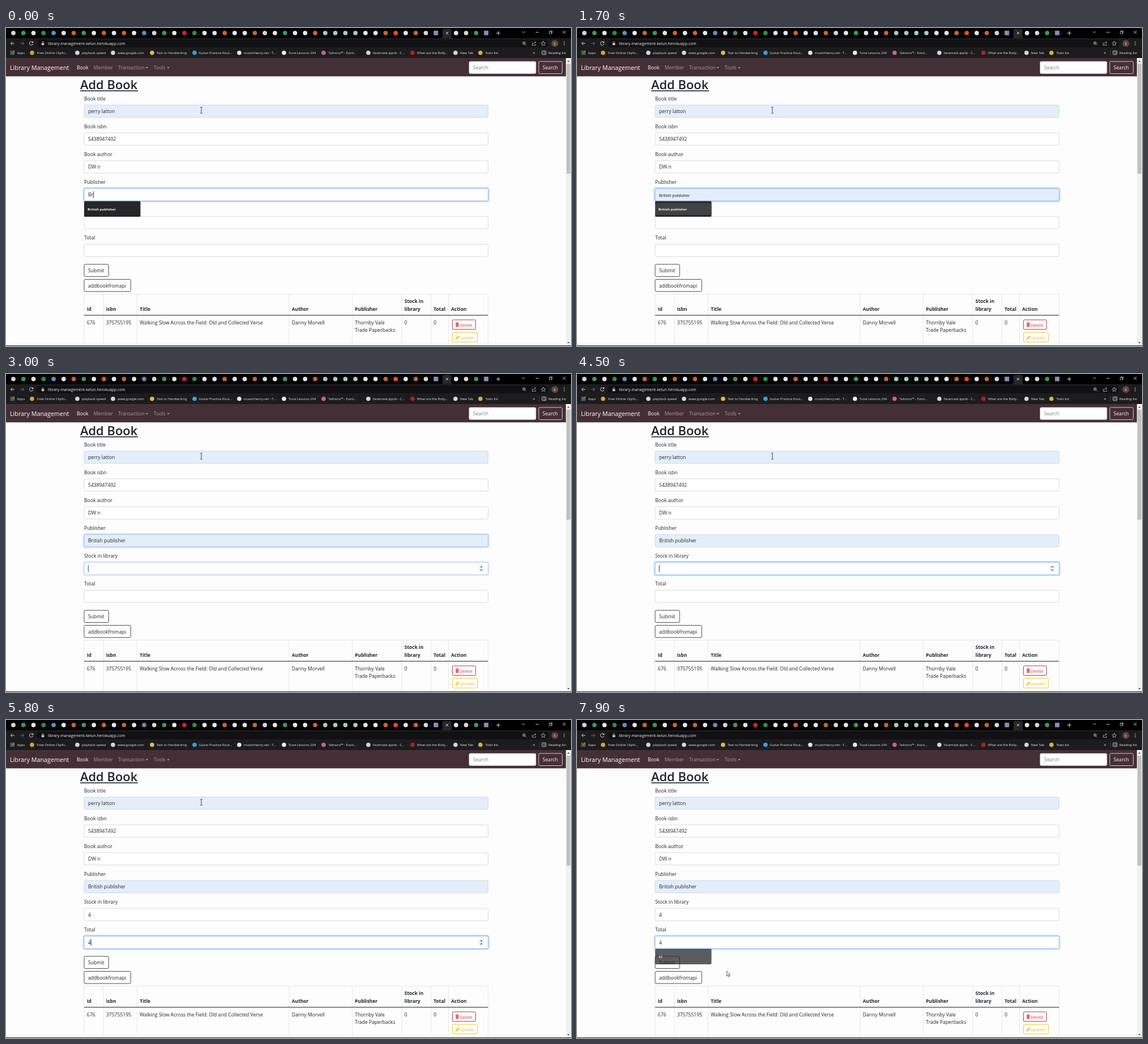
These frames come from a looping animation (998 px wide and 561 px high, 8000 ms). An HTML page:

```html
<!DOCTYPE html>
<html lang="en">
<head>
<meta charset="utf-8">
<title>Library Management</title>
<style>
html, body { margin: 0; width: 100%; height: 100%; overflow: hidden; background: #fdfdfd; }
svg { display: block; width: 998px; height: 561px; }
text { font-family: "Open Sans", "Noto Sans", sans-serif; white-space: pre; }
</style>
</head>
<body>
<svg id="stage" viewBox="0 0 998 561"></svg>
<script>
const LOOP = 8000;
const INK = '#212529', BODY = 8.62, LEFT = 138, RIGHT = 851.5;
const stage = document.getElementById('stage');

const attrs = o => Object.entries(o).map(([k, v]) => ` ${k}="${v}"`).join('');
const rect = (x, y, w, h, o = {}) => `<rect x="${x}" y="${y}" width="${w}" height="${h}"${attrs(o)}/>`;
const dot = (x, y, r, fill, o = {}) => `<circle cx="${x}" cy="${y}" r="${r}" fill="${fill}"${attrs(o)}/>`;
const path = (d, o = {}) => `<path d="${d}"${attrs({ fill: 'none', ...o })}/>`;
const text = (x, y, s, size = BODY, fill = INK, o = {}) =>
  `<text x="${x}" y="${y}" font-size="${size}" fill="${fill}"${attrs(o)}>${s}</text>`;
const group = (id, inner) => `<g id="${id}">${inner}</g>`;
const line = (d, stroke, w = 0.9) => path(d, { stroke, 'stroke-width': w });
const BOLD = { 'font-weight': 700 };

// ---- browser window
const tabColors = {
  w: '#d4d6d8', g: '#e4e7ea', n: '#3c9a52', i: '#2f8d46', b: '#5b8fc4', o: '#c9662b',
  r: '#d3222a', s: '#9fcfc0', d: '#ec4a22', p: '#9a82bd'
};
const tabs = 'wngibgongogogbwngriggoggowgnggossssggodgowp-gwnp';

function tabStrip() {
  let s = rect(0, 0, 998, 18, { fill: '#000' });
  [...tabs].forEach((c, i) => {
    const x = 13 + i * 17.77;
    if (c === '-') {
      s += path('M769 18Q771 18 771 15V4Q771 1.500 773.500 1.500H784.500Q787 1.500 787 4V15Q787 18 789 18Z', { fill: '#26272a' });
      s += line('M777 6.800L781.200 11M781.200 6.800L777 11', '#f1f1f1');
    } else if (c === 'p') {
      s += rect(x - 4, 4.800, 8, 8, { fill: tabColors.p, rx: 0.8 });
    } else {
      s += dot(x, 8.800, 3.900, tabColors[c]);
    }
    if (i < 42 || i > 43) s += rect(x + 8.7, 5, 0.5, 8, { fill: '#3a3b3e' });
  });
  return s + line('M866 9H873M869.500 5.500V12.500', '#eee') +
    line('M911.500 6L914 8.500L916.500 6', '#ddd') +
    line('M935.500 7.500H941', '#ddd') +
    line('M959.500 6.200H963.500V10.200H959.500ZM960.700 6.200V5H964.700V9H963.500', '#ddd', 0.7) +
    line('M983.500 5L988.500 10M988.500 5L983.500 10', '#ddd');
}

const bookmarks = [
  [46, '#d9a52e', 55, 'Free Online Clipfo...'],
  [126, '#d4d6d8', 134, 'playback speed'],
  [189, '#d4d6d8', 197, 'www.google.com'],
  [258, '#e9b64a', 266, 'Text to Handwriting'],
  [333, '#38a3d6', 340.5, 'Guitar Practice Rout...'],
  [412, '#e8e8e8', 420, 'musictheory.net - T...'],
  [491, '#ececec', 499, 'Tune Lessons 204'],
  [561, '#cf5f8d', 569.5, 'Talinora™ - Exoti...'],
  [640, '#d4d6d8', 648, 'facemask.ipynb - C...'],
  [718, '#b3201f', 726, 'What are the Bolly...'],
  [794, '#d4d6d8', 802, 'New Tab'],
  [838, '#d9b13c', 846.5, 'Todo list']
];

function toolbar() {
  const light = '#e6e6e6', small = 5.86;
  let s = rect(0, 18, 998, 35, { fill: '#1c1c1e' }) +
    rect(54, 20.5, 904, 13.5, { rx: 6.7, fill: '#111113' }) +
    line('M14.800 27.200H8.500M11.200 24.300L8.300 27.200L11.200 30.100', light) +
    line('M25 27.200H31.300M28.600 24.300L31.500 27.200L28.600 30.100', '#77797c') +
    line('M47.200 25.200A3.200 3.200 0 1 0 47.700 28', light) +
    path('M48.200 23.300V26.300H45.200Z', { fill: light }) +
    rect(62.8, 26.5, 4.6, 3.8, { fill: '#c8cacc', rx: 0.4 }) +
    line('M63.800 26.500V25.300A1.300 1.300 0 0 1 66.400 25.300V26.500', '#c8cacc', 0.7) +
    text(74, 29.8, 'library-management-kelun.herokuapp.com', 6.84, '#f2f2f2') +
    dot(915, 26.6, 2.4, 'none', { stroke: '#d0d0d0', 'stroke-width': 0.8 }) +
    line('M916.800 28.400L919 30.600M913.800 26.600H916.200M915 25.400V27.800', '#d0d0d0', 0.7) +
    line('M929.500 26V30.500H935.500V28.500M931 28.500Q931.500 25.500 935.500 25.200M933.800 23.500L935.700 25.200L933.800 27', '#d0d0d0', 0.7) +
    path('M949 23.200L950.100 25.900L953 26.100L950.800 28L951.500 30.800L949 29.300L946.500 30.800L947.200 28L945 26.100L947.900 25.900Z', { stroke: '#d0d0d0', 'stroke-width': 0.7 }) +
    dot(969.5, 27.2, 6, '#5f4640') +
    text(969.5, 29.6, 'k', 6.2, '#eedfd9', { 'text-anchor': 'middle' });
  for (const dy of [-2.6, 0, 2.6]) s += dot(986, 27.2 + dy, 0.75, light);

  const apps = ['#e2503f', '#e2503f', '#e8b33a', '#46a35a', '#d0d0d0', '#e8b33a', '#46a35a', '#4a86d8', '#4a86d8'];
  apps.forEach((c, i) => { s += rect(7.5 + i % 3 * 2.7, 40 + Math.floor(i / 3) * 2.7, 1.9, 1.9, { fill: c }); });
  s += text(19.5, 45.8, 'Apps', small, light);
  for (const [ix, color, x, label] of bookmarks) s += dot(ix, 43.7, 3.8, color) + text(x, 45.8, label, small, light);
  return s + text(930.5, 46, '»', 8, light) + rect(942, 39.5, 0.6, 8.5, { fill: '#55575a' }) +
    rect(946.8, 40.3, 7, 6.6, { rx: 0.8, fill: 'none', stroke: light, 'stroke-width': 0.8 }) +
    line('M948.200 42.400H949.400M950.200 42.400H952.600M948.200 44.700H949.400M950.200 44.700H952.600', light, 0.8) +
    text(958, 45.8, 'Reading list', small, light);
}

// ---- page
function navbar() {
  const dim = '#a69a9e';
  const drop = x => path(`M${x} 68.900H${x + 5}L${x + 2.5} 71.500Z`, { fill: dim });
  return rect(0, 53, 989, 32.3, { fill: '#452f37' }) +
    text(7, 73.8, 'Library Management', 10.77, '#fff') +
    text(125, 73.2, 'Book', BODY, '#fff') +
    text(154.800, 73.2, 'Member', BODY, dim) +
    text(198, 73.2, 'Transaction', BODY, dim) + drop(246.3) +
    text(260.800, 73.2, 'Tools', BODY, dim) + drop(284.2) +
    rect(818, 59, 118, 21.5, { rx: 2.2, fill: '#fff', stroke: '#ced4da', 'stroke-width': 0.6 }) +
    text(825, 73.2, 'Search', BODY, '#797f85') +
    rect(941, 59, 41.5, 21.5, { rx: 2.2, fill: 'none', stroke: '#f1eff0', 'stroke-width': 0.8 }) +
    text(947.8, 73.2, 'Search', BODY, '#f8f9fa');
}

const fieldTop = i => 135.9 + i * 49.1;
const baseline = i => 150.1 + i * 49.1;
const labels = ['Book title', 'Book isbn', 'Book author', 'Publisher', 'Stock in library', 'Total'];
const values = ['perry latton', '5438947492', 'DW n', '', '', ''];

function spinner(i) {
  const y = fieldTop(i) + 10.8;
  return group('spin' + i, rect(835, y - 6.2, 9, 12.4, { fill: '#efefef' }) +
    path(`M837.600 ${y - 2}L839.600 ${y - 4.2}L841.600 ${y - 2}ZM837.600 ${y + 2}L839.600 ${y + 4.2}L841.600 ${y + 2}Z`, { fill: '#444' }));
}

function form() {
  let s = text(131, 108.2, 'Add Book', 21.9, INK, { 'font-weight': 600 }) +
    rect(131.2, 110, 102, 1.6, { fill: INK });
  labels.forEach((label, i) => {
    const y = fieldTop(i), w = RIGHT - LEFT;
    s += text(LEFT, baseline(i) - 22.2, label) +
      rect(LEFT - 1.1, y - 1.1, w + 2.2, 23.9, { id: 'halo' + i, rx: 3.2, fill: 'none', stroke: '#bcd8fb', 'stroke-width': 2.4, opacity: 0 }) +
      rect(LEFT, y, w, 21.7, { id: 'box' + i, rx: 2.2, fill: i ? '#fff' : '#e4eefa', stroke: i ? '#ced4da' : '#c3d3e6', 'stroke-width': 0.8 }) +
      text(145, baseline(i), values[i], BODY, INK, { id: 'val' + i });
    if (i > 3) s += spinner(i);
  });
  const button = (y, w, label) =>
    rect(LEFT, y, w, 21.5, { rx: 2.2, fill: 'none', stroke: '#33373b', 'stroke-width': 0.9 }) +
    text(145, y + 14.1, label);
  return s + rect(0, 0, 0.9, 12, { id: 'caret', fill: '#222' }) +
    button(416.9, 43.3, 'Submit') + button(443.4, 82.3, 'addbookfromapi');
}

function table() {
  const cols = [138, 172, 231.5, 500, 611.5, 699, 750.5, 781.5, RIGHT];
  const heads = ['Id', 'isbn', 'Title', 'Author', 'Publisher', '', 'Total', 'Action'];
  const cells = ['676', '375755195', 'Walking Slow Across the Field: Old and Collected Verse',
    'Danny Morvell', 'Thornby Vale', '0', '0'];
  let s = line(`M138 469.500H${RIGHT}` + cols.map(x => `M${x} 469.500V560`).join(''), '#dee2e6', 0.8);
  heads.forEach((h, i) => { s += text(cols[i] + 4.8, 498.6, h, 8.45, INK, BOLD); });
  cells.forEach((c, i) => { s += text(cols[i] + 4.8, 522.7, c); });
  s += text(703.800, 484.8, 'Stock in', 8.45, INK, BOLD) + text(703.800, 498.6, 'library', 8.45, INK, BOLD) +
    text(616.300, 536.3, 'Trade Paperbacks') +
    rect(LEFT, 506.2, RIGHT - LEFT, 1.1, { fill: '#2b2f33' });
  const red = '#dc3545', gold = '#f5bf1c';
  return s +
    rect(788.5, 514.9, 41, 16.7, { rx: 1.6, fill: 'none', stroke: '#8e3540', 'stroke-width': 0.9 }) +
    path('M793.800 520.300H800.200V521.200H793.800ZM795.800 519.500H798.200V520.300H795.800ZM794.400 521.700H799.600L799.200 527.200H794.800Z', { fill: red }) +
    line('M796 522.500V526.400M797 522.500V526.400M798 522.500V526.400', '#fdfdfd', 0.35) +
    text(801, 526.7, 'Delete', 7.6, red) +
    rect(788.5, 537.2, 44, 16.7, { rx: 1.6, fill: 'none', stroke: gold, 'stroke-width': 0.9 }) +
    path('M793.800 549.600L794.400 547.300L799 542.700L800.700 544.400L796.100 549Z', { fill: gold }) +
    text(801.3, 549.2, 'Update', 7.6, gold);
}

function suggestion(id, y, label) {
  return group(id, rect(LEFT, y, 99.5, 27.3, { rx: 1.4, fill: '#262729' }) +
    rect(LEFT, y + 3, 99.5, 21.3, { id: id + 'Row', fill: '#414244', opacity: 0 }) +
    text(144, y + 16, label, 6, '#f4f4f4', BOLD));
}

const scrollbar = () => rect(989, 53, 9, 507, { fill: '#f1f1f1' }) +
  rect(990, 63, 7, 194, { fill: '#c1c1c1' }) +
  path('M991.300 59.500H995.700L993.500 57Z', { fill: '#505050' }) +
  path('M991.300 554H995.700L993.500 556.500Z', { fill: '#505050' });

const pointers = () =>
  group('beam', line('M-2 -5.300H-0.600L0 -4.700L0.600 -5.300H2M0 -4.700V4.700M-2 5.300H-0.600L0 4.700L0.600 5.300H2', '#333', 0.9)) +
  group('arrow', path('M0 0V8.600L2 6.800L3.300 9.800L4.700 9.200L3.400 6.300H6.100Z', { fill: '#fff', stroke: '#222', 'stroke-width': 0.7 }));

stage.innerHTML = rect(0, 0, 998, 561, { fill: '#fdfdfd' }) + tabStrip() + toolbar() + navbar() + form() + table() +
  suggestion('hintA', 305.6, 'British publisher') + suggestion('hintB', 403.7, '47') +
  scrollbar() + rect(0, 560, 998, 1, { fill: '#2e251f' }) + pointers();

// ---- motion
const $ = {};
stage.querySelectorAll('[id]').forEach(e => { $[e.id] = e; });
const set = (id, o) => { for (const k in o) $[id].setAttribute(k, o[k]); };
const show = (id, on) => set(id, { visibility: on ? 'visible' : 'hidden' });
const ramp = (t, a, b) => Math.min(1, Math.max(0, (t - a) / (b - a)));
const ease = u => u * u * (3 - 2 * u);
const mix = (a, b, u) => a + (b - a) * u;
const blend = (a, b, u) => `rgb(${a.map((v, i) => Math.round(mix(v, b[i], u)))})`;
const say = (i, s) => { if ($['val' + i].textContent !== s) $['val' + i].textContent = s; };

function pointer(t) {
  const a = ease(ramp(t, 6500, 6700)), b = ease(ramp(t, 6900, 7800));
  const x = mix(mix(345, 298, a), 264.6, b), y = mix(mix(145, 156, a), 443.2, b);
  const inField = labels.some((_, i) => y >= fieldTop(i) && y <= fieldTop(i) + 21.7);
  show('beam', inField);
  show('arrow', !inField);
  const transform = `translate(${x.toFixed(2)} ${y.toFixed(2)})`;
  set('beam', { transform });
  set('arrow', { transform });
}

function draw(t) {
  const typed = t < 300 ? 'Br' : t < 500 ? 'Bri' : 'Brit';
  const filled = t >= 1500, preview = filled && t < 2400;
  say(3, filled ? 'British publisher' : typed);
  say(4, t >= 4600 ? '4' : '');
  say(5, t >= 5800 ? '4' : '');
  $.val3.style.fontFamily = preview ? '"Liberation Sans", Arial, sans-serif' : '';
  set('val3', { 'font-size': preview ? 7.64 : BODY, y: baseline(3) + (preview ? 0.2 : 0) });

  const toStock = ease(ramp(t, 2880, 3160)), toTotal = ease(ramp(t, 4950, 5200));
  const focus = { 3: 1 - toStock, 4: toStock * (1 - toTotal), 5: toTotal * (1 - ramp(t, 7800, 8500)) };
  for (const i in focus) {
    const blue = i === '3' && filled;
    set('halo' + i, { opacity: focus[i] });
    set('box' + i, {
      fill: blue ? '#e4eefa' : '#fff',
      stroke: blend(blue ? [195, 211, 230] : [206, 212, 218], [134, 183, 254], Math.min(1, focus[i] * 1.6))
    });
  }

  const active = t < 2900 ? 3 : t < 5000 ? 4 : 5;
  show('spin4', active === 4);
  show('spin5', active === 5 && t < 7700);
  const blinkOff = (t >= 1300 && t < 2400) || (t >= 3700 && t < 4500) || t >= 6600;
  show('caret', !blinkOff);
  set('caret', { x: 144.8 + $['val' + active].getComputedTextLength(), y: baseline(active) - 9.4 });

  set('hintA', { opacity: 1 - ramp(t, 2350, 2700) });
  set('hintARow', { opacity: filled ? 1 : 0 });
  set('hintB', { opacity: ramp(t, 5820, 6100) * (1 - ramp(t, 7800, 8200)) });
  pointer(t);
}

const start = performance.now();
function tick() {
  draw((performance.now() - start) % LOOP);
  requestAnimationFrame(tick);
}
tick();
</script>
</body>
</html>
```
